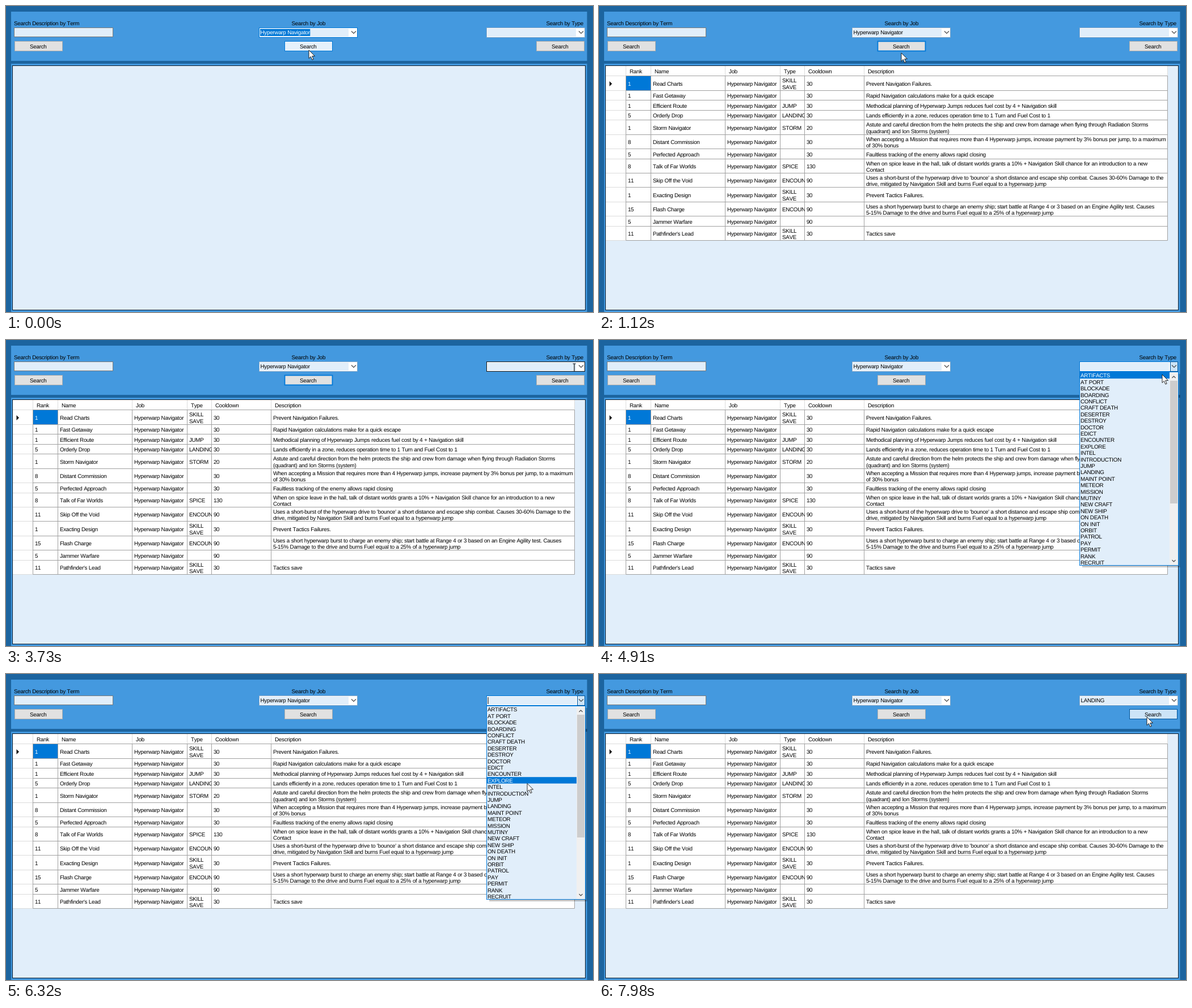
Recreate the animation shown at these times as an HTML page. Size 1035 by 541 pixels, loop 8000 ms.

```html
<!DOCTYPE html>
<html lang="en">
<head>
<meta charset="utf-8">
<title>Skill search</title>
<style>
html, body { margin: 0; width: 100%; height: 100%; overflow: hidden; background: #1c649f; }
svg { display: block; }
text {
  font-family: "Liberation Sans", Arial, sans-serif;
  font-size: 9.8px;
  letter-spacing: -.26px;
  word-spacing: .2px;
  font-kerning: none;
  text-rendering: geometricPrecision;
  white-space: pre;
}
</style>
</head>
<body>
<svg id="stage" width="1035" height="541" viewBox="0 0 1035 541"></svg>
<script>
const LOOP = 8000;
const BLUE = '#0078d7', PALE = '#e1eefa', LINE = '#a0a0a0', SOFT = '#dcdcdc', IDLE = '#86a8c8';
const JOB = 'Hyperwarp Navigator';

// rank, name, type, cooldown, description; "|" breaks a line
const SKILLS = [
  [1, 'Read Charts', 'SKILL|SAVE', 30, 'Prevent Navigation Failures.'],
  [1, 'Fast Getaway', '', 30, 'Rapid Navigation calculations make for a quick escape'],
  [1, 'Efficient Route', 'JUMP', 30, 'Methodical planning of Hyperwarp Jumps reduces fuel cost by 4 + Navigation skill'],
  [5, 'Orderly Drop', 'LANDING', 30, 'Lands efficiently in a zone, reduces operation time to 1 Turn and Fuel Cost to 1'],
  [1, 'Storm Navigator', 'STORM', 20, 'Astute and careful direction from the helm protects the ship and crew from damage when flying through Radiation Storms|(quadrant) and Ion Storms (system)'],
  [8, 'Distant Commission', '', 30, 'When accepting a Mission that requires more than 4 Hyperwarp jumps, increase payment by 3% bonus per jump, to a maximum|of 30% bonus'],
  [5, 'Perfected Approach', '', 30, 'Faultless tracking of the enemy allows rapid closing'],
  [8, 'Talk of Far Worlds', 'SPICE', 130, 'When on spice leave in the hall, talk of distant worlds grants a 10% + Navigation Skill chance for an introduction to a new|Contact'],
  [11, 'Skip Off the Void', 'ENCOUNTER', 90, "Uses a short-burst of the hyperwarp drive to 'bounce' a short distance and escape ship combat. Causes 30-60% Damage to the|drive, mitigated by Navigation Skill and burns Fuel equal to a hyperwarp jump"],
  [1, 'Exacting Design', 'SKILL|SAVE', 30, 'Prevent Tactics Failures.'],
  [15, 'Flash Charge', 'ENCOUNTER', 90, 'Uses a short hyperwarp burst to charge an enemy ship; start battle at Range 4 or 3 based on an Engine Agility test. Causes|5-15% Damage to the drive and burns Fuel equal to a 25% of a hyperwarp jump'],
  [5, 'Jammer Warfare', '', 90, ''],
  [11, "Pathfinder's Lead", 'SKILL|SAVE', 30, 'Tactics save']
].map(([rank, name, ...rest]) => [rank, name, JOB, ...rest].map(String));
const HEADS = ['Rank', 'Name', 'Job', 'Type', 'Cooldown', 'Description'];
const TYPES = ('ARTIFACTS,AT PORT,BLOCKADE,BOARDING,CONFLICT,CRAFT DEATH,DESERTER,DESTROY,DOCTOR,EDICT,' +
  'ENCOUNTER,EXPLORE,INTEL,INTRODUCTION,JUMP,LANDING,MAINT POINT,METEOR,MISSION,MUTINY,NEW CRAFT,' +
  'NEW SHIP,ON DEATH,ON INIT,ORBIT,PATROL,PAY,PERMIT,RANK,RECRUIT').split(',');

const rect = (x, y, w, h, fill, more = '') =>
  `<rect x="${x}" y="${y}" width="${w}" height="${h}" fill="${fill}" ${more}/>`;
const box = (x, y, w, h, fill, stroke, more = '') =>
  rect(x + .5, y + .5, w - 1, h - 1, fill, `stroke="${stroke}" ${more}`);
const path = (d, more = '') => `<path d="${d}" ${more}/>`;
const text = (x, mid, s, fill = '#000', more = '') =>
  `<text x="${x}" y="${mid + 3.5}" fill="${fill}" ${more}>${s}</text>`;
const group = (id, inner) => `<g id="${id}">${inner}</g>`;
const chevron = (x, y, dir = 1, size = 4) =>
  path(`M${x - size} ${y - dir * 2}l${size} ${dir * size}l${size} ${-dir * size}`, 'fill="none" stroke="#444" stroke-width="1.1"');

function wrap(s, max) {
  const lines = [''];
  for (const word of s.replace(/\|/g, ' ').split(' ')) {
    const last = lines[lines.length - 1];
    if (last && last.length + word.length + 1 > max) lines.push(word);
    else lines[lines.length - 1] = last ? last + ' ' + word : word;
  }
  return lines;
}

function table(id, xs, ys, max) {
  const right = xs[6], bottom = ys[13];
  let out = rect(12, 106, right - 12, bottom - 106, '#fff');
  out += rect(xs[0], ys[0], xs[1] - xs[0], ys[1] - ys[0], BLUE);
  HEADS.forEach((s, c) => out += text(xs[c] + 6.5, 115.5, s));
  out += path(xs.map(x => `M${x} 106V${ys[0]}`).join(''), `stroke="${SOFT}"`);
  out += path(ys.map(y => `M12 ${y}H${xs[0]}`).join(''), `stroke="${SOFT}"`);
  out += path(xs.map(x => `M${x} ${ys[0]}V${bottom}`).join('') +
    ys.map(y => `M${xs[0]} ${y}H${right}`).join(''), `stroke="${LINE}"`);
  SKILLS.forEach((row, r) => row.forEach((s, c) => {
    if (!s) return;
    const x = xs[c], y = ys[r], h = ys[r + 1] - y;
    const lines = max ? wrap(s, max) : s.split('|');
    const first = max && lines.length > 1 ? 8 : h / 2 + .8 - (lines.length - 1) * 5.7;
    const body = lines.slice(0, 2).map((l, i) =>
      text(3.4, first + i * 11.4, l, r + c ? '#000' : '#fff')).join('');
    out += `<svg x="${x}" y="${y}" width="${xs[c + 1] - x}" height="${h - .5}" overflow="hidden">${body}</svg>`;
  }));
  const mid = (ys[0] + ys[1]) / 2 + 1;
  out += path(`M18.5 ${mid - 4.5}l4.5 4.5l-4.5 4.5z`, 'fill="#111"');
  return group(id, out);
}

const button = (id, x) => group(id,
  box(x, 62, 85, 18, '#e1e1e1', '#adadad') +
  text(x + 41.8, 71, 'Search', '#000', 'text-anchor="middle"'));

const combo = (id, x) => group(id,
  box(x, 38, 174, 18, '#fff', IDLE, 'class="edge"') +
  rect(x + 2, 40, 156, 14, PALE) +
  box(x + 160, 38, 14, 18, '#cce4f7', '#005499', 'class="drop"') +
  chevron(x + 167, 46.5) +
  rect(x + 2, 40.5, 0, 12.5, BLUE, 'class="mark"') +
  text(x + 2.5, 46.5, '', '#000', 'class="value"'));

const ITEM = 11.4, LIST_TOP = 56.8;
const list = () => group('list',
  rect(852, 60, 173, 342, '#000', 'opacity=".22"') +
  box(847, 56, 175, 343, PALE, BLUE) +
  rect(848, 0, 158, ITEM, BLUE, 'id="pick"') +
  TYPES.map((s, i) => text(849, LIST_TOP + (i + .5) * ITEM + .3, s, '#000', 'class="item"')).join('') +
  rect(1006, 57, 15, 341, '#f0f0f0') + rect(1007, 72, 13, 217, '#cdcdcd') +
  chevron(1013.5, 65, -1, 3) + chevron(1013.5, 391, 1, 3));

const rawX = [...Array(7)].map((_, i) => 47.5 + i * 87.6);
const rawY = [...Array(14)].map((_, i) => 123.8 + i * 19.32);

const stage = document.getElementById('stage');
stage.innerHTML =
  `<clipPath id="painted">${path('M12 106H1003V296H223V321H12Z')}</clipPath>` +
  rect(0, 0, 1035, 541, '#1c649f') +
  rect(9, 10, 1015.5, 87, '#4499df') +
  rect(9, 102, 1015.5, 439, '#4499df') +
  box(11, 105, 1011, 433, PALE, '#0c1c2c') +
  text(14, 30, 'Search Description by Term') +
  text(503.5, 30, 'Search by Job') +
  text(952.5, 30, 'Search by Type') +
  box(14, 38, 175, 17, PALE, '#7a7a7a') +
  combo('job', 446) + combo('type', 847) +
  button('termGo', 15) + button('jobGo', 491) + button('typeGo', 935) +
  table('raw', rawX, rawY, 18) +
  table('grid', [47.5, 91.5, 222.5, 319.5, 362.5, 467.5, 1002.5],
    [123.5, 149.5, 166.5, 184.5, 201.5, 227.5, 252.5, 270.5, 295.5, 320.5, 346.5, 371.5, 389.5, 414.5]) +
  list() +
  rect(849.5, 41, 1, 12, '#000', 'id="caret"') +
  group('arrow', path('M0 0V14.6L3.4 11.4L5.8 17.2L8.2 16.2L5.8 10.6H10.5Z', 'fill="#fff" stroke="#111" stroke-width=".9"')) +
  group('beam', path('M-2.5 -7H2.5M0 -7V6.5M-2.5 6.5H2.5', 'stroke="#111" fill="none" stroke-width="1.2"'));

const el = id => document.getElementById(id);
const items = [...document.querySelectorAll('.item')];
const show = (id, on) => el(id).setAttribute('display', on ? 'inline' : 'none');
const set = (node, attrs) => { for (const k in attrs) node.setAttribute(k, attrs[k]); };

// pointer legs: first step, last step, step count, end x, end y
const LEGS = [
  [150, 450, 3, 535, 77],
  [840, 1120, 3, 533, 83],
  [2550, 3580, 9, 1009, 46],
  [3730, 3730, 1, 1002, 49],
  [3856, 4360, 5, 1012, 49],
  [4640, 4910, 3, 993, 61],
  [5060, 5620, 5, 945, 114],
  [5770, 6320, 5, 919, 193.5],
  [6470, 6770, 3, 905, 229],
  [7020, 7980, 8, 966, 76]
];
const smooth = k => k * k * (3 - 2 * k);

// returns the held pointer place and the time of the latest step
function pointer(t) {
  let x = 534, y = 78, held = 0;
  for (const [a, b, n, ex, ey] of LEGS) {
    if (t < a) break;
    const gap = n > 1 ? (b - a) / (n - 1) : 1;
    const i = Math.min(n - 1, Math.floor((t - a) / gap + 1e-6));
    const k = n > 5 ? smooth((i + 1) / n) : (i + 1) / n;
    x += (ex - x) * k;
    y += (ey - y) * k;
    held = a + i * gap;
  }
  return { x, y, held };
}

const LOOKS = {
  plain: ['#e1e1e1', '#adadad', 1],
  focus: ['#e1e1e1', BLUE, 1.8],
  hover: ['#e5f1fb', BLUE, 1],
  down: ['#cce4f7', '#005499', 1]
};
function paintButton(id, look) {
  const [fill, stroke, width] = LOOKS[look];
  set(el(id).firstChild, { fill, stroke, 'stroke-width': width });
}
function paintCombo(id, value, marked, edge, open) {
  const part = c => el(id).querySelector('.' + c);
  const label = part('value');
  if (label.textContent !== value) label.textContent = value;
  label.setAttribute('fill', marked ? '#fff' : '#000');
  part('mark').setAttribute('width', marked ? label.getComputedTextLength() + 1 : 0);
  part('edge').setAttribute('stroke', edge);
  part('drop').setAttribute('display', open ? 'inline' : 'none');
}

function draw(t) {
  const { x, y, held } = pointer(t);
  const inside = left => x >= left && x < left + 85 && y >= 62 && y < 80;
  const open = t >= 4108 && t < 7020;
  const beam = t >= 3730 && t < 3856;

  show('raw', t >= 300 && t < 570);
  show('grid', t >= 450);
  el('grid').setAttribute('clip-path', t < 570 ? 'url(#painted)' : 'none');

  paintButton('jobGo', t >= 150 && t < 300 ? 'down' : inside(491) ? 'hover'
    : t >= 300 && t < 4108 ? 'focus' : 'plain');
  paintButton('typeGo', t >= 7980 ? 'down' : inside(935) ? 'hover' : 'plain');

  const over = t >= 3730 && t < 4108;
  const marked = t >= 7020 && t < 7980;
  paintCombo('job', JOB, t < 150, t < 150 ? BLUE : IDLE, false);
  paintCombo('type', t >= 7020 ? 'LANDING' : '', marked,
    over ? '#171717' : open || marked ? BLUE : IDLE, open);

  show('list', open);
  const at = y >= LIST_TOP ? Math.floor((y - LIST_TOP) / ITEM) : -1;
  set(el('pick'), { y: LIST_TOP + at * ITEM, visibility: at < 0 ? 'hidden' : 'inherit' });
  items.forEach((item, i) => item.setAttribute('fill', i === at ? '#fff' : '#000'));
  show('caret', open && (held - 3860) % 1060 < 500);

  show('arrow', !beam);
  show('beam', beam);
  set(el(beam ? 'beam' : 'arrow'), { transform: `translate(${x.toFixed(1)} ${y.toFixed(1)})` });
}

function tick() {
  draw(performance.now() % LOOP);
  requestAnimationFrame(tick);
}
tick();
</script>
</body>
</html>
```
